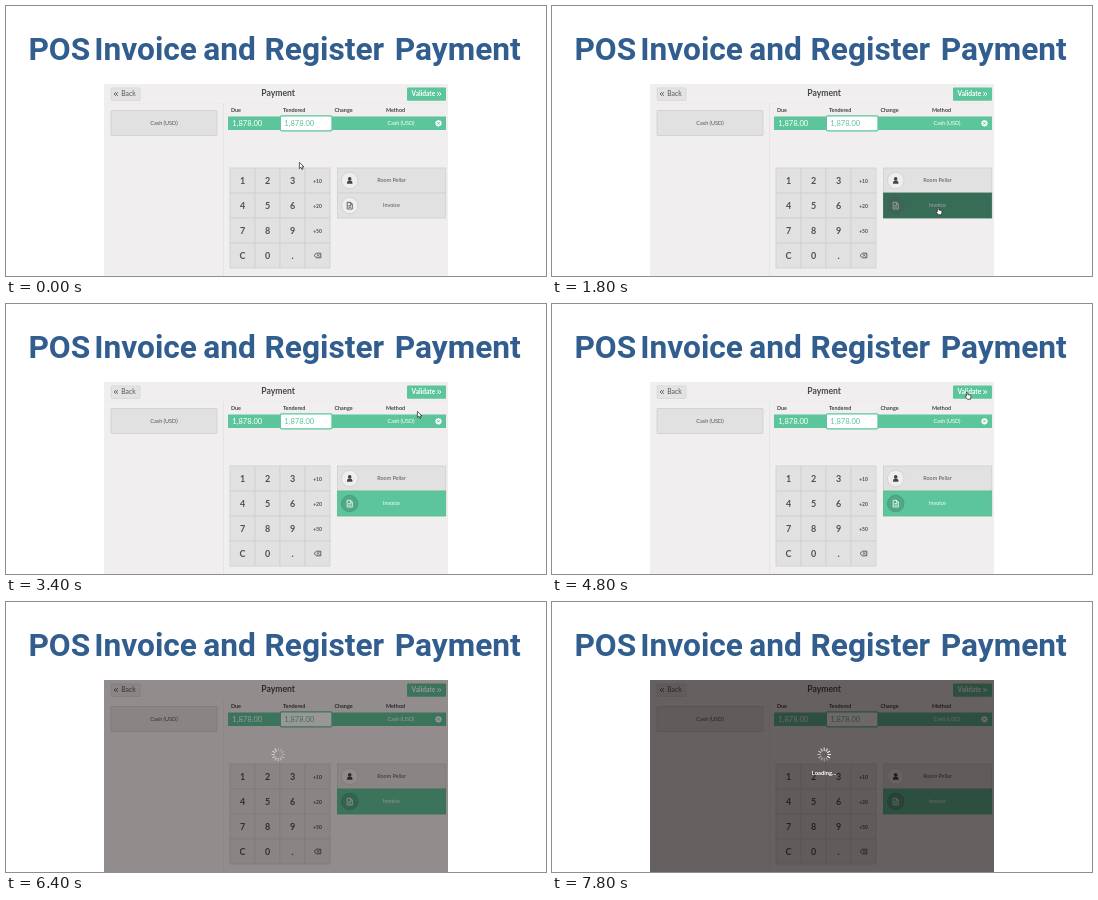
An HTML page for the animation above (8000 ms loop, 540 by 270 pixels).

```html
<!DOCTYPE html>
<html lang="en">
<head>
<meta charset="utf-8">
<title>Invoice and payment</title>
<style>
  html, body { margin: 0; width: 100%; height: 100%; overflow: hidden; background: #fff; }
  svg { display: block; width: 540px; height: 270px; font-family: Lato, "Open Sans", sans-serif; }
  .title { font: 700 31.7px Roboto, Inter, sans-serif; fill: #315e8e; }
  .mid { text-anchor: middle; }
  .bold { font-weight: 700; }
</style>
</head>
<body>
<svg id="stage" viewBox="0 0 540 270"></svg>
<script>
const NS = 'http://www.w3.org/2000/svg';
const stage = document.getElementById('stage');
const LOOP = 8000;
const GREEN = '#5dc59b', GREY = '#e2e1e1', EDGE = '#d0cfcf', INK = '#555';

function set(node, attrs) {
  for (const key in attrs) node.setAttribute(key, attrs[key]);
}
function add(tag, attrs, parent = stage) {
  const node = document.createElementNS(NS, tag);
  set(node, attrs);
  return parent.appendChild(node);
}
function box(x, y, width, height, fill, stroke = 'none', rx = 0) {
  return add('rect', { x, y, width, height, fill, stroke, rx, 'stroke-width': 0.8 });
}
function label(text, x, y, size, fill = INK, cls = '') {
  const node = add('text', { x, y, 'font-size': size, fill, class: cls });
  node.textContent = text;
  return node;
}
// Double chevron, pointing left (-1) or right (1)
function chevrons(x, y, way, stroke) {
  const arm = `l${1.7 * way} 1.8l${-1.7 * way} 1.8`;
  add('path', { d: `M${x} ${y}${arm}M${x + 2 * way} ${y}${arm}`, fill: 'none', stroke, 'stroke-width': 0.9 });
}

// Heading and panel
[['POS', 22.4], ['Invoice', 88.2], ['and', 197.3], ['Register', 258.6], ['Payment', 388.8]]
  .forEach(([word, x]) => add('text', { x, y: 54, class: 'title' }).textContent = word);
box(98, 78, 344, 192, '#f0eeee');
box(217, 97, 1, 173, '#e6e4e4');
box(98, 97, 344, 0.6, '#ebe9e9');
box(105.2, 81.9, 28.8, 12.6, '#e4e3e3', '#d6d5d5', 1);
chevrons(111.8, 86.2, -1, INK);
label('Back', 115.2, 90.4, 6.8);
label('Payment', 272.2, 90, 8.6, '#484848', 'mid bold');
box(401, 81.5, 39, 13.2, GREEN, 'none', 1);
label('Validate', 405.6, 90.4, 6.6, '#fff', 'bold');
chevrons(431.3, 86.2, 1, '#fff');

// Payment line
box(105, 104.5, 106, 25, GREY, EDGE, 0.5);
label('Cash (USD)', 158, 119, 5.5, INK, 'mid');
[['Due', 225], ['Tendered', 277], ['Change', 328.5], ['Method', 380]]
  .forEach(([text, x]) => label(text, x, 106.3, 5.4, '#444', 'bold'));
box(222, 110.5, 218, 13.5, GREEN);
set(box(274.3, 109.8, 51.7, 15, '#fff', GREEN, 1.5), { 'stroke-width': 1.3 });
label('1,878.00', 226.3, 120, 7.6, '#fff');
label('1,878.00', 278.3, 120, 7.6, GREEN);
label('Cash (USD)', 395, 119.1, 5.4, '#fff', 'mid');
add('circle', { cx: 432.5, cy: 117.3, r: 3.1, fill: '#fff' });
add('path', { d: 'M431.3 116.1l2.4 2.4m0-2.4l-2.4 2.4', stroke: GREEN, 'stroke-width': 1 });

// Keypad
const keys = ['1', '2', '3', '+10', '4', '5', '6', '+20', '7', '8', '9', '+50', 'C', '0', '.', ''];
keys.forEach((key, i) => {
  const x = 224 + i % 4 * 25, y = 162 + Math.floor(i / 4) * 25;
  box(x, y, 25, 25, GREY, EDGE);
  const small = key.length > 1;
  label(key, x + 12.5, y + (small ? 14.5 : 16), small ? 5 : 9, '#505050', 'mid bold');
});
add('path', {
  d: 'M308 249.5l2.4-2.3h4.4v4.6h-4.4zM311 248.3l2.3 2.3m0-2.3l-2.3 2.3',
  fill: 'none', stroke: '#505050', 'stroke-width': 0.9
});

// Customer and invoice buttons
function actionButton(y, text) {
  return {
    back: box(331.4, y, 108.3, 25, GREY, EDGE),
    disc: add('circle', { cx: 343.7, cy: y + 12.5, r: 8.3, fill: '#efeeee', stroke: '#cfcece', 'stroke-width': 0.8 }),
    text: label(text, 385.5, y + 14.2, 5.4, INK, 'mid')
  };
}
actionButton(162, 'Room Pellar');
add('path', { d: 'M341 177.8v-1.4q0-1.8 2.7-1.8t2.7 1.8v1.4z', fill: '#444' });
add('circle', { cx: 343.7, cy: 172.9, r: 1.8, fill: '#444' });
const invoice = actionButton(187, 'Invoice');
invoice.icon = add('path', {
  d: 'M341.2 196.3h3.3l1.8 1.8v4.9h-5.1zM344.4 196.3v1.9h1.9M342.4 199.6h2.7M342.4 201.2h2.7',
  fill: 'none', 'stroke-width': 0.8
});

// Pointer
const pointer = add('g', { 'stroke-linejoin': 'round', stroke: '#222', 'stroke-width': 0.7, fill: '#fff' });
const arrow = add('path', { d: 'M.4 .4v6.2l1.5-1.3 1 2.2 1.1-.5-1-2.1h2z' }, pointer);
const hand = add('path', {
  d: 'M1.4 4.6V1.2q0-.8.7-.8t.7.8V3l2.4.5q.9.3.8 1.2l-.5 3.1H2.4L.4 5.2q-.1-1 1-.6z'
}, pointer);

// Loading cover
const shade = box(98, 78, 344, 192, '#0c0202');
const spinner = add('g', { stroke: '#fff', 'stroke-width': 1.2, 'stroke-linecap': 'round' });
for (let i = 0; i < 12; i++) {
  add('path', { d: 'M0-3.9v-2.4', transform: `rotate(${i * 30})`, opacity: 0.3 + 0.7 * i / 11 }, spinner);
}
const loading = label('Loading...', 272, 172.6, 5.8, '#fff', 'mid bold');

// Each schedule entry: start time, then the values held from that time
const skins = {
  idle: [GREY, EDGE, '#efeeee', '#cfcece', INK, '#444'],
  dim: ['#555', '#555', '#686868', '#686868', '#bbb', '#aaa'],
  down: ['#111', '#000', '#484848', '#484848', '#333', '#484848'],
  dimGreen: ['#376c57', '#376c57', '#3f6354', '#3f6354', '#aaa', '#aaa'],
  on: [GREEN, '#56b990', '#50a985', '#489a79', '#fff', '#fff']
};
const buttonSteps = [
  [0, 'idle'], [800, 'dim'], [900, 'down'], [1000, 'dimGreen'], [1100, 'on'],
  [1800, 'dimGreen'], [1900, 'down'], [2000, 'dim'], [2100, 'idle'],
  [2300, 'down'], [2400, 'on']
];
const pointerSteps = [
  [0, 293, 156], [100, 322, 171], [200, 360, 188, 1], [300, 393, 200, 1], [400, 384, 201, 1],
  [3100, 402, 129], [3300, 406, 119], [3400, 411, 107], [3500, 414, 100],
  [3700, 414, 94, 1], [3800, 413, 87.5, 1]
];
const shadeSteps = [[0, 0, 0], [6400, 0.41, 0.65], [6600, 0.6, 1]];
const spinTimes = [6400, 6600, 6800, 6900, 7000, 7100, 7300, 7500, 7600, 7700, 7800].map(t => [t]);

function at(steps, t) {
  let held = steps[0];
  for (const step of steps) if (step[0] <= t) held = step;
  return held;
}
function show(node, visible) {
  node.setAttribute('visibility', visible ? 'visible' : 'hidden');
}

function draw(t) {
  const [fill, edge, disc, rim, text, icon] = skins[at(buttonSteps, t)[1]];
  set(invoice.back, { fill, stroke: edge });
  set(invoice.disc, { fill: disc, stroke: rim });
  set(invoice.text, { fill: text });
  set(invoice.icon, { stroke: icon });

  const [, x, y, pressing] = at(pointerSteps, t);
  const [, dark, glow] = at(shadeSteps, t);
  set(pointer, { transform: `translate(${x} ${y})` });
  show(arrow, !dark && !pressing);
  show(hand, !dark && pressing);

  const turn = Math.round((at(spinTimes, t)[0] - 6400) * 12 / 1000) * 30;
  set(shade, { opacity: dark });
  set(spinner, { transform: `translate(272.2 152.5) rotate(${turn})`, opacity: glow });
  show(loading, t >= 7300);
}

function tick() {
  draw(performance.now() % LOOP);
  requestAnimationFrame(tick);
}
tick();
</script>
</body>
</html>
```
